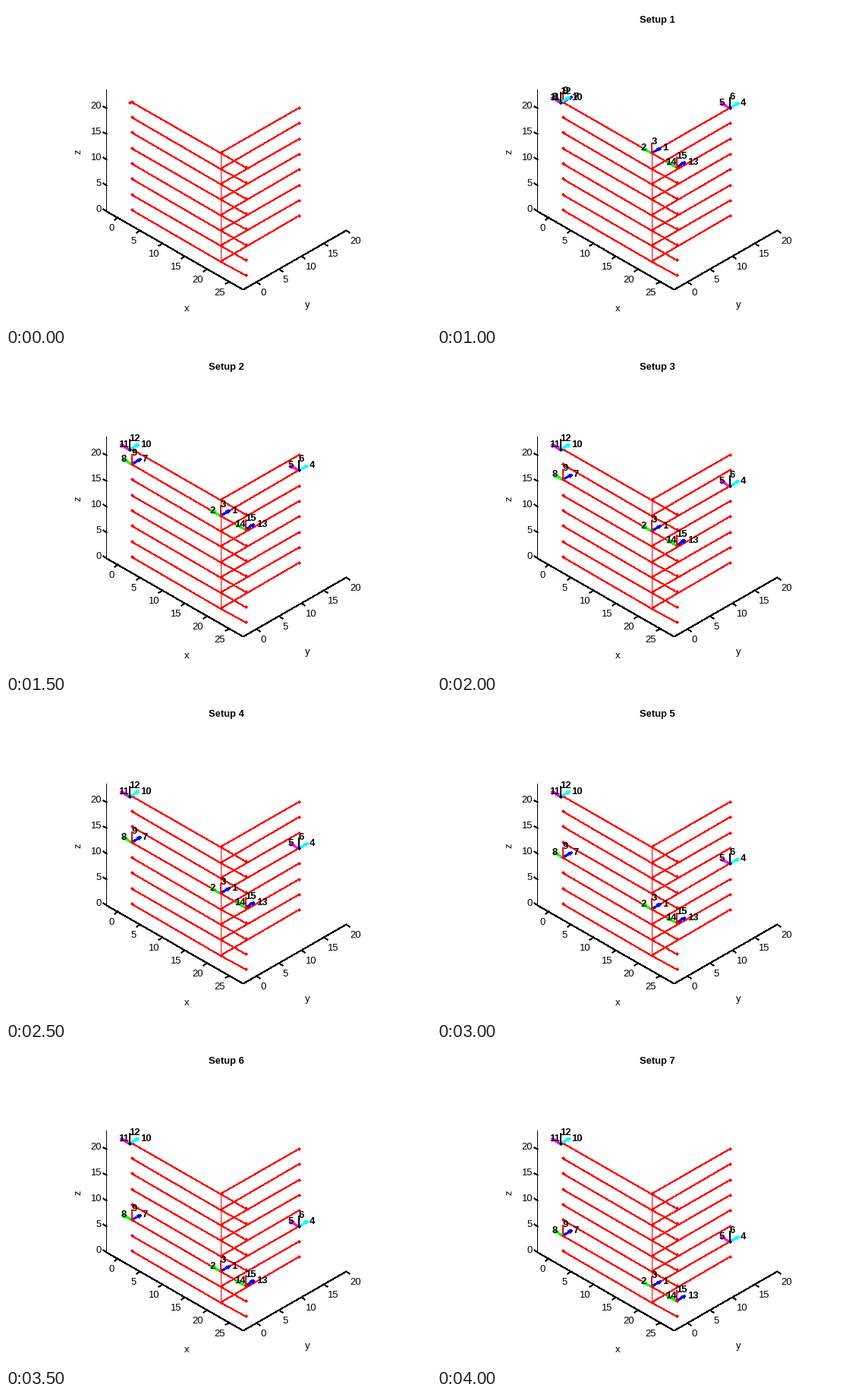
These frames come from a looping animation (560 by 420 pixels, 4500 ms). A matplotlib script:

```python
import numpy as np
import matplotlib.pyplot as plt
from matplotlib.animation import FuncAnimation

W, H, DPI = 560, 420, 80
PX = 72 / DPI  # points per pixel

plt.rcParams.update({
    "font.family": "Liberation Sans",
    "font.size": 13 * PX,
    "lines.antialiased": False,
    "lines.linewidth": PX,
    "toolbar": "None",
})

fig = plt.figure(figsize=(W / DPI, H / DPI), dpi=DPI, facecolor="white")
ax = fig.add_axes([0, 0, 1, 1])
ax.set_xlim(-0.5, W - 0.5)
ax.set_ylim(H - 0.5, -0.5)
ax.axis("off")

ORIGIN = np.array([165.2, 268.1])
BASIS = np.array([[5.85, 3.375], [5.886, -3.39], [0, -6.777]])
XMIN, XMAX, YMIN, YMAX, ZMAX = -2.6, 28.15, -3.06, 20, 23.5


def project(points):
    """Axonometric projection to whole pixels."""
    return np.round(ORIGIN + np.asarray(points, float) @ BASIS)


def line(points, color="k", **style):
    return ax.plot(*project(points).T, color=color, **style)[0]


def dots(points, color):
    return line(points, color, ls="", marker="D", ms=3.6 * PX, mew=0)


def label(x, y, s, **style):
    """Text whose digits are centred on height y."""
    return ax.text(x, y + 4.5, s, va="baseline", **style)


def tick(start, step, value, dx, dy, ha):
    start = np.array(start, float)
    line([start, start + step])
    x, y = project(start)
    label(x + dx, y + dy, str(value), ha=ha)


# Axes
line([(XMIN, YMIN, ZMAX), (XMIN, YMIN, 0), (XMAX, YMIN, 0), (XMAX, YMAX, 0)])
for v in range(0, 26, 5):
    tick((v, YMIN, 0), (0, -0.75, 0), v, -5, 13.5, "right")
for v in range(0, 21, 5):
    tick((XMAX, v, 0), (0.75, 0, 0), v, 5, 13.5, "left")
    tick((XMIN, YMIN, v), (-0.75, 0, 0), v, -7, -3.5, "right")
ax.text(238, 402, "x", ha="center", va="baseline")
ax.text(397, 397, "y", ha="center", va="baseline")
ax.text(95, 191, "z", ha="center", va="center", rotation=90)

# Building frame: eight floors, 3 units apart
CORNER, RIGHT, LEFT, FRONT = (20, 0), (20, 17.5), (0, 0), (25.53, 0)
REF = (-0.11, -0.4, 21)
floors = np.arange(8) * 3
for z in floors:
    for a, b in ((LEFT, CORNER), (CORNER, FRONT), (CORNER, RIGHT)):
        line([(*a, z), (*b, z)], "r")
    dots([(*p, z) for p in (LEFT, CORNER, RIGHT, FRONT)], "r")
line([(*CORNER, 0), (*CORNER, 21)], "r")
dots([REF], "r")

# Sensors: one arrow along y, -x and z each
DIRS = 2 * np.array([[0, 1, 0], [-1, 0, 0], [0, 0, 1]])
WARM, COOL = ("blue", "lime", "red"), ("cyan", "magenta", "black")


def arrow_points(base, d):
    tip = base + d
    side = 0.33 * np.array([d[1], -d[0], 0])
    barbs = [tip - 0.33 * (d + s * side) for s in (1, -1)]
    return project([base, tip, barbs[0], tip, barbs[1]])


class Sensor:
    def __init__(self, place, colors, first):
        self.place = place
        self.arrows = [
            line([(0, 0, 0)], c, lw=2 * PX,
                 solid_joinstyle="bevel", solid_capstyle="butt")
            for c in colors]
        self.dot = dots([(0, 0, 0)], colors[-1])
        self.names = [label(0, 0, str(first + i), weight="bold", ha="left")
                      for i in range(3)]
        self.artists = [*self.arrows, self.dot, *self.names]

    def move(self, z):
        base = np.array((*self.place, z)[:3], float)
        x, y = project(base)
        self.dot.set_data([x], [y])
        for d, arrow, name in zip(DIRS, self.arrows, self.names):
            arrow.set_data(*arrow_points(base, d).T)
            dx, dy = 1.2 * d @ BASIS
            name.set_position((x + dx, y + dy + 4.5))


sensors = [Sensor(CORNER, WARM, 1), Sensor(RIGHT, COOL, 4),
           Sensor(LEFT, WARM, 7), Sensor(REF, COOL, 10),
           Sensor(FRONT, WARM, 13)]
title = ax.text(289.5, 22, "", ha="center", va="baseline", weight="bold")


def update(i):
    setup = i - 1  # the bare frame holds for two steps
    shown = setup > 0
    title.set_text(f"Setup {setup}" if shown else "")
    for s in sensors:
        s.move(21 - 3 * (setup - 1))
        for a in s.artists:
            a.set_visible(shown)
    return [title] + [a for s in sensors for a in s.artists]


anim = FuncAnimation(fig, update, frames=9, interval=500,
                     repeat=True, repeat_delay=0, blit=False)
plt.show()
```
